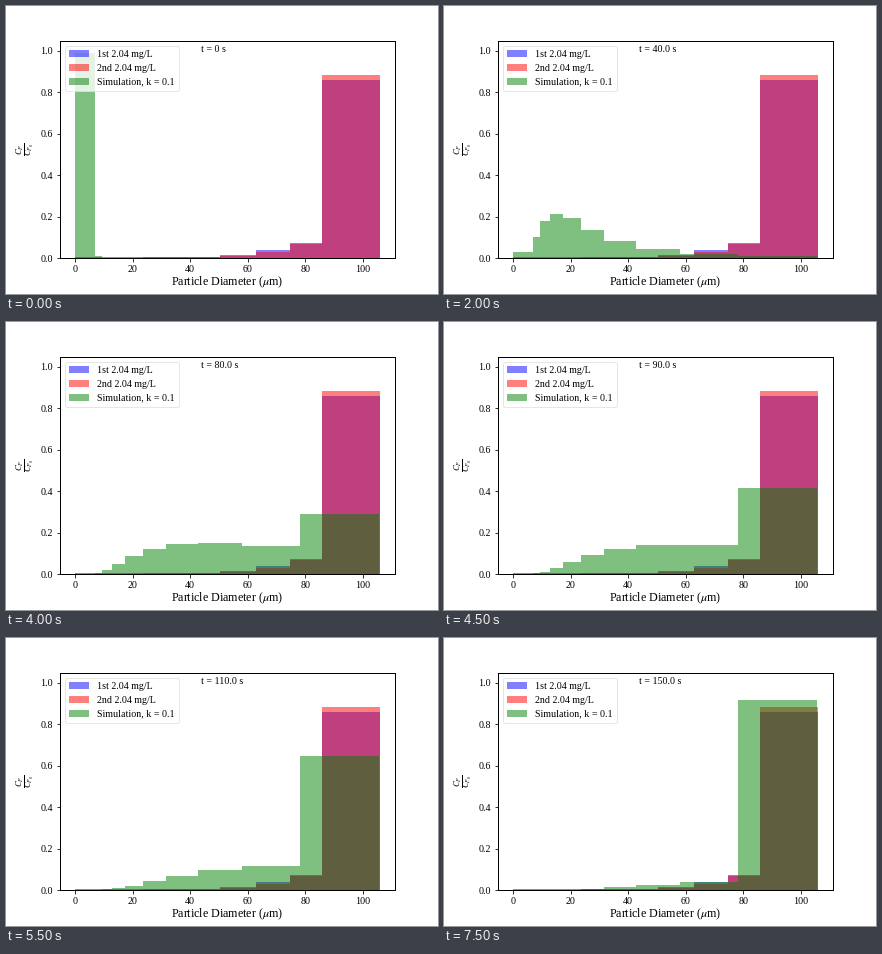
A matplotlib script for the animation above (8 s loop, 432x288 px).

```python
import math

import matplotlib.pyplot as plt
import numpy as np
from matplotlib.animation import FuncAnimation

plt.rcParams.update({
    "font.family": "Liberation Serif",
    "mathtext.fontset": "stix",
    "font.size": 10,
    "axes.linewidth": 1.0,
    "legend.edgecolor": "0.88",
})

FRAMES, INTERVAL = 16, 500
STEP = 10.0       # simulated seconds per frame
RATE = 0.0893     # growth steps per second
DELAY = 0.1       # the first state is one solver step in
BINS = 10

# Floc diameters double in mass at each step, fractal dimension 2.3
sim_edges = np.r_[0, 7.012 * 2 ** (np.arange(BINS) / 2.3)]
obs_edges = np.array([0, 23.5, 36.8, 50.3, 62.8, 74.6, 85.75, 105.8])
first = [0.003, 0.003, 0.004, 0.014, 0.038, 0.072, 0.860]
second = [0.001, 0.003, 0.004, 0.011, 0.030, 0.069, 0.883]


def fractions(t):
    """Poisson share of each size class, the last one collecting the rest."""
    lam = RATE * (t + DELAY)
    p = [math.exp(-lam) * lam ** n / math.factorial(n) for n in range(BINS - 1)]
    return p + [1 - sum(p)]


def draw_bars(edges, heights, color, label):
    return ax.bar(edges[:-1], heights, np.diff(edges), align="edge",
                  color=color, alpha=0.5, label=label)


fig, ax = plt.subplots(figsize=(6, 4), dpi=72)
fig.subplots_adjust(left=0.125, right=0.9, bottom=0.125, top=0.88)

draw_bars(obs_edges, first, "blue", "1st 2.04 mg/L")
draw_bars(obs_edges, second, "red", "2nd 2.04 mg/L")
sim = draw_bars(sim_edges, fractions(0), "green", "Simulation, k = 0.1")

margin = 0.05 * obs_edges[-1]
ax.set_xlim(-margin, obs_edges[-1] + margin)
ax.set_ylim(0, 1.05)
ax.set_xlabel(r"Particle Diameter ($\mu$m)", fontsize=12, labelpad=1)
ax.set_ylabel(r"$\frac{C_P}{C_{P_0}}$", fontsize=12, labelpad=3)
ax.legend(loc="upper left")
clock = ax.text(0.42, 0.947, "", transform=ax.transAxes)


def update(i):
    t = i * STEP
    for bar, h in zip(sim, fractions(t)):
        bar.set_height(h)
    clock.set_text(f"t = {t:.1f} s" if i else "t = 0 s")
    return [*sim, clock]


anim = FuncAnimation(fig, update, frames=FRAMES, interval=INTERVAL,
                     repeat=True, repeat_delay=0)
plt.show()
```
